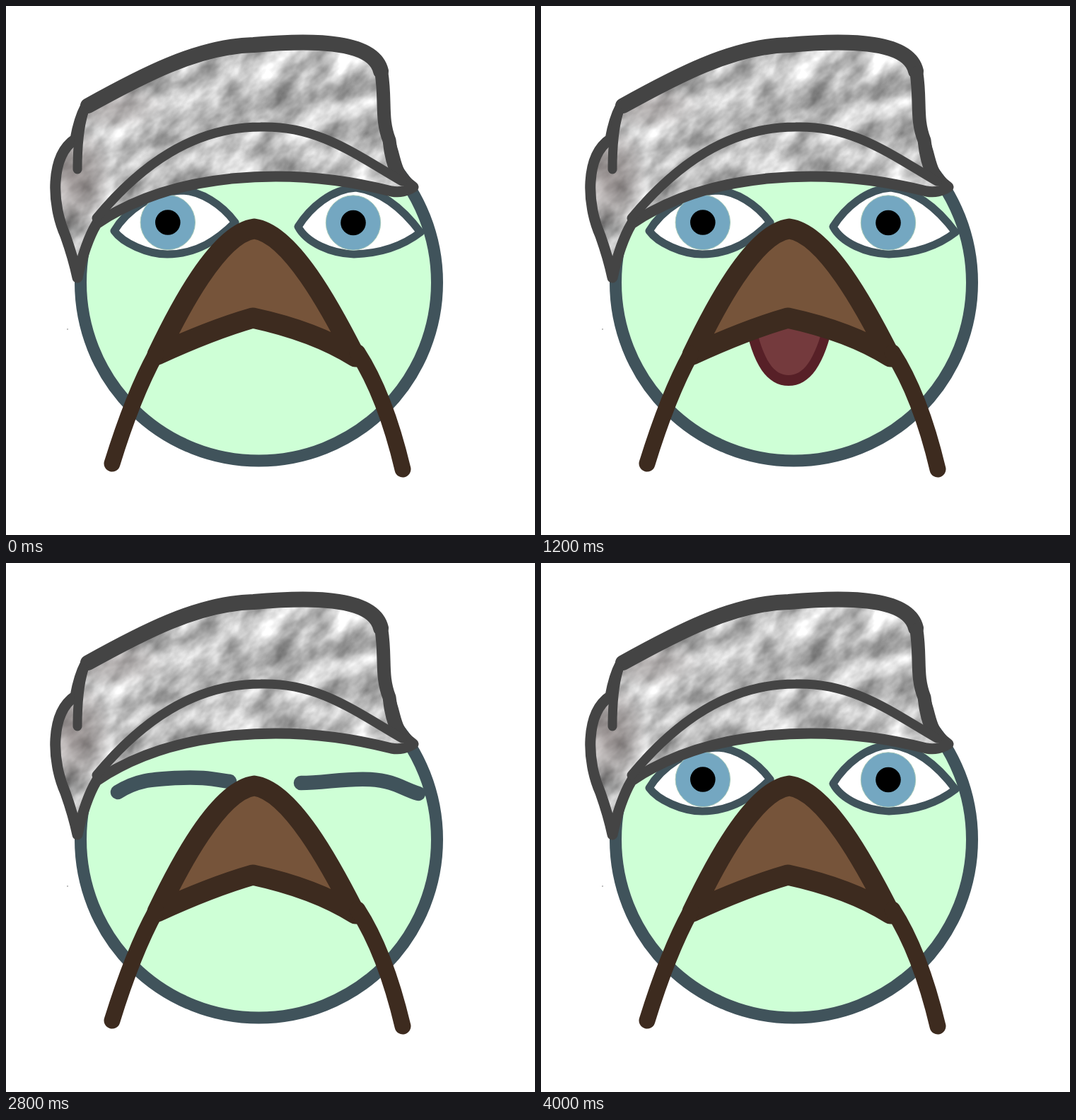
Write an HTML page that moves like this. It is 748 px wide and 748 px high and loops after 4.2 s.

```html
<!DOCTYPE html>
<html lang="en">
<head>
<meta charset="utf-8">
<title>Bird in a cap</title>
<style>
  html, body { margin: 0; width: 100%; height: 100%; overflow: hidden; background: #fff; }
  svg { display: block; width: 100vw; height: 100vh; }
  .line { fill: none; stroke-linecap: round; stroke-linejoin: round; }
  .tongue, .open, .shut { animation: 4200ms step-end infinite; }
  .tongue { animation-name: talk; }
  .open { animation-name: blink; }
  .shut { animation-name: lids; }
  @keyframes talk {
    0%, 9.5238%, 19.0476%, 33.3333%, 42.8571%, 100% { opacity: 0; }
    4.7619%, 14.2857%, 28.5714%, 38.0952% { opacity: 1; }
  }
  @keyframes blink {
    0%, 71.4285%, 95.238%, 100% { opacity: 1; }
    66.6666%, 90.4761% { opacity: 0; }
  }
  @keyframes lids {
    0%, 71.4285%, 95.238%, 100% { opacity: 0; }
    66.6666%, 90.4761% { opacity: 1; }
  }
</style>
</head>
<body>
<svg viewBox="0 0 748 748">
  <defs>
    <filter id="cloud" x="0" y="0" width="100%" height="100%" color-interpolation-filters="sRGB">
      <feTurbulence type="fractalNoise" baseFrequency=".018 .03" numOctaves="4" seed="8"/>
      <feColorMatrix values=".8 0 0 0 .35  .8 0 0 0 .35  .8 0 0 0 .35  0 0 0 0 1"/>
    </filter>
    <radialGradient id="stain">
      <stop stop-color="#6b5f5e" stop-opacity=".55"/>
      <stop offset="1" stop-color="#a89694" stop-opacity="0"/>
    </radialGradient>
    <path id="cap" d="M112 143C190 100 270 57 350 55C440 47 520 50 530 95C537 135 530 160 542 190S548 235 576 256Q562 265 545 262C400 225 235 235 128 308Q112 335 101 384C97 365 90 342 84 325C64 280 62 212 98 188Q103 160 112 143Z"/>
    <clipPath id="cloth"><use href="#cap"/></clipPath>
    <g id="iris">
      <circle r="38.7" fill="#74a7c1" stroke="#a5c8b8"/>
      <circle r="17.8"/>
    </g>
  </defs>

  <circle cx="87" cy="457" r="1" fill="#aaa"/>
  <circle cx="357.5" cy="391" r="252" fill="#ceffd6" stroke="#40535b" stroke-width="17"/>

  <g class="open">
    <g fill="#fff" stroke="#40535b" stroke-width="11" stroke-linejoin="round">
      <path d="M153 318C170 290 205 263 250 261C275 262 305 280 324 306C300 330 270 351 228 351C200 351 165 335 153 318Z"/>
      <path d="M413 312C430 285 460 259 495 257C530 262 560 285 586 320C560 340 530 350 492 351C460 350 425 335 413 312Z"/>
    </g>
    <use href="#iris" x="228.8" y="306"/>
    <use href="#iris" x="491" y="306.5"/>
  </g>
  <g class="shut line" stroke="#40535b" stroke-width="20.5">
    <path d="M158 324C185 307 205 306 240 304S290 305 316 309"/>
    <path d="M417 311C450 311 480 304 515 306S560 319 583 326"/>
  </g>

  <g clip-path="url(#cloth)">
    <rect y="-120" width="640" height="640" transform="rotate(-42 320 200)" filter="url(#cloud)"/>
    <ellipse cx="95" cy="240" rx="55" ry="75" fill="url(#stain)"/>
    <ellipse cx="150" cy="142" rx="75" ry="34" fill="url(#stain)" opacity=".6"/>
  </g>
  <g class="line" stroke="#444">
    <use href="#cap" stroke-width="15"/>
    <path stroke-width="22" d="M116 141C190 100 270 57 350 55C440 47 520 50 530 92"/>
    <path stroke-width="19" d="M531 95C537 135 530 160 542 190Q545 220 555 240"/>
    <path stroke-width="13" d="M128 300C190 225 265 171 360 171C440 169 490 207 560 248M110 150Q101 180 101 231"/>
  </g>

  <g class="tongue">
    <path fill="#572027" d="M288 445C299 508 320 537 350 537S401 508 414 445Z"/>
    <path fill="#743a3d" d="M302 445C314 503 330 522 350 522S387 503 401 445Z"/>
  </g>
  <g class="line" stroke="#3d2b1f">
    <path fill="#76543a" stroke-width="29" style="fill:#76543a" d="M351 315C300 322 244 430 214 493Q290 458 349 441Q437 460 494 496C458 425 402 322 351 315Z"/>
    <path stroke-width="23" d="M212 492Q180 550 150 647M497 490Q536 550 561 655"/>
  </g>
</svg>
</body>
</html>
```
